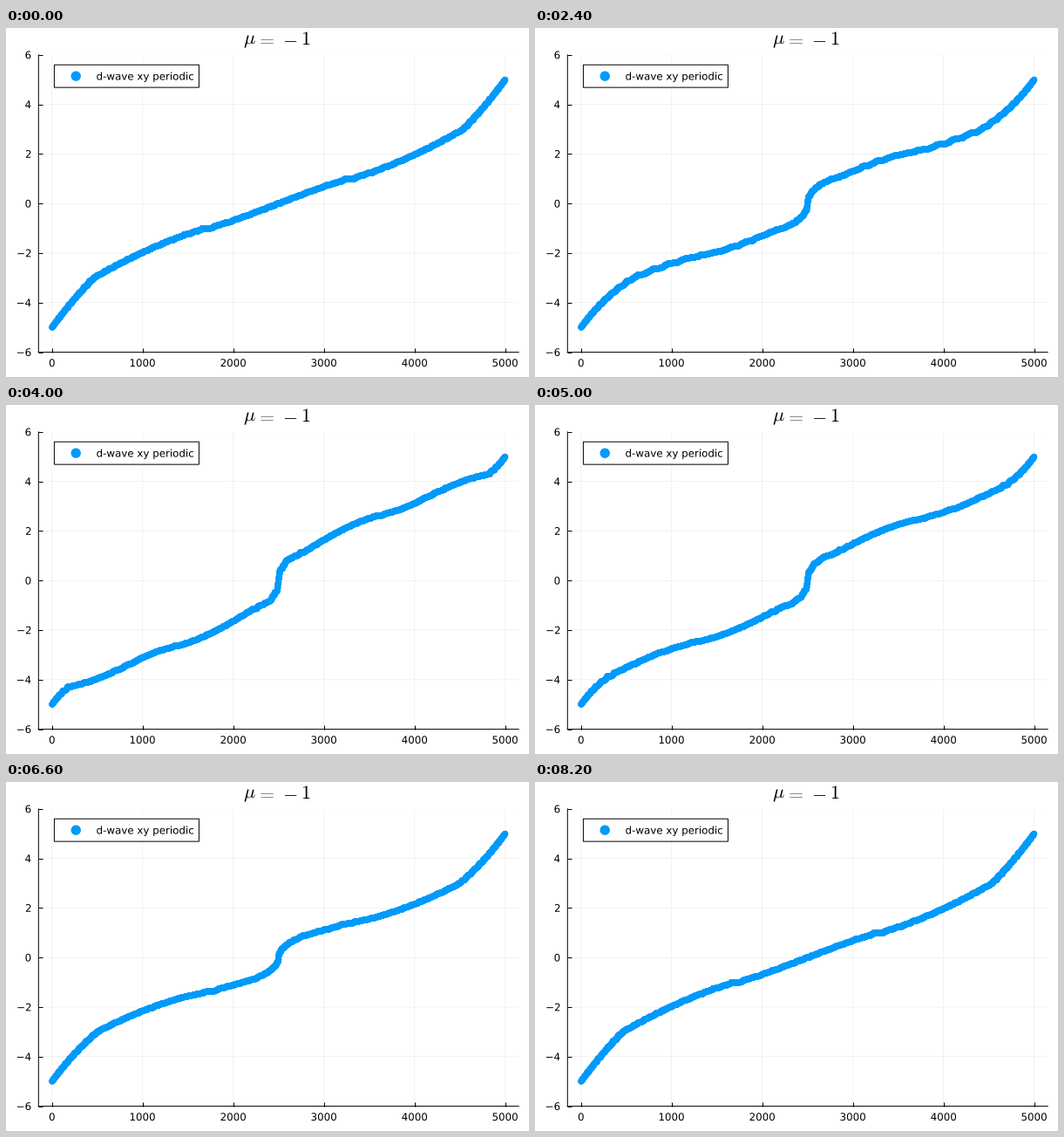
A matplotlib script that plays this animation: 600 px wide and 400 px high, repeating every 8400 ms.

```python
import numpy as np
import matplotlib.pyplot as plt
from matplotlib.animation import FuncAnimation
from matplotlib.patches import Circle, PathPatch, Rectangle
from matplotlib.textpath import TextPath
from matplotlib.transforms import Affine2D

W, H, DPI = 600, 400, 100
PX = 72 / DPI                      # points per pixel
BLUE = "#009AFA"
LEFT, RIGHT, TOP, BOTTOM = 37.3, 588.2, 30.87, 371.61
FONT = 11.85                       # text size in pixels

SITES = 50                         # lattice of SITES x SITES, periodic both ways
MU = -1
STEPS = 20                         # pairing strength climbs from 0 to 1

plt.rcParams.update({
    "font.family": "DejaVu Sans",
    "mathtext.fontset": "cm",
    "text.hinting": "none",
})

k = 2 * np.pi * np.arange(SITES) / SITES
kx, ky = np.meshgrid(k, k)
xi = -2 * (np.cos(kx) + np.cos(ky)) - MU
form = 4 * np.sin(kx) * np.sin(ky)
index = np.arange(1, 2 * SITES**2 + 1)


def spectrum(delta):
    """Sorted quasiparticle energies for a d-wave gap of strength delta."""
    e = np.hypot(xi, delta * form).ravel()
    return np.sort(np.concatenate([-e, e]))


fig = plt.figure(figsize=(W / DPI, H / DPI), dpi=DPI, facecolor="white")

ax = fig.add_axes([LEFT / W, 1 - BOTTOM / H, (RIGHT - LEFT) / W, (BOTTOM - TOP) / H])
margin = 0.03 * (index[-1] - index[0])
x0, x1 = index[0] - margin, index[-1] + margin
ax.set_xlim(x0, x1)
ax.set_ylim(-6, 6)
ax.set_xticks(range(0, 5001, 1000))
ax.set_yticks(range(-6, 7, 2))
ax.set_axisbelow(True)
ax.grid(color="black", alpha=0.1, linewidth=0.5 * PX)
ax.tick_params(direction="in", length=4.7 * PX, width=1 * PX,
               labelleft=False, labelbottom=False)
for side in ("top", "right"):
    ax.spines[side].set_visible(False)
for side in ("left", "bottom"):
    ax.spines[side].set_linewidth(1 * PX)

# keep thin lines at their true subpixel positions
for axis in (ax.xaxis, ax.yaxis):
    for line in [*axis.get_gridlines(), *axis.get_ticklines()]:
        line.set_snap(False)
for spine in ax.spines.values():
    spine.set_snap(False)

# one size per point keeps the dots at subpixel positions
dots = ax.scatter(index, spectrum(0), s=np.full(index.size, (7.2 * PX) ** 2),
                  c=BLUE, edgecolors="none", zorder=3)

# overlay in pixel coordinates for all text and the legend
top = fig.add_axes([0, 0, 1, 1])
top.set_xlim(0, W)
top.set_ylim(H, 0)
top.axis("off")


def label(x, y, text, anchor):
    """Outline text on baseline y; anchor 0, 0.5, 1 is left, centre, right."""
    path = TextPath((0, 0), text, size=FONT)
    box = path.get_extents()
    shift = x - box.x0 - anchor * box.width
    path = Affine2D().scale(1, -1).translate(shift, y).transform_path(path)
    top.add_patch(PathPatch(path, facecolor="black", linewidth=0, snap=False))


for v in range(0, 5001, 1000):
    label(LEFT + (v - x0) / (x1 - x0) * (RIGHT - LEFT), 388, str(v), 0.5)
for v in range(-6, 7, 2):
    y = BOTTOM - (v + 6) / 12 * (BOTTOM - TOP)
    label(LEFT - 8.9, y + 4.32, str(v).replace("-", "\u2212"), 1)

for x, glyph, color in ((279.5, r"$\mu$", "black"), (298, "$=$", "#777777"),
                        (326, "$-$", "black"), (343.7, "$1$", "black")):
    top.text(x, 18.6, glyph, size=22 * PX, color=color, ha="center", va="baseline")

top.add_patch(Rectangle((55.4, 42.2), 166, 25.92, facecolor="white",
                        edgecolor="black", linewidth=1 * PX, snap=False))
top.add_patch(Circle((80.2, 55.15), 5.7, facecolor=BLUE, edgecolor="none"))
label(104.2, 59.47, "d-wave xy periodic", 0)


def update(i):
    step = min(i, 2 * STEPS + 1 - i)
    dots.set_offsets(np.column_stack([index, spectrum(step / STEPS)]))
    return (dots,)


anim = FuncAnimation(fig, update, frames=2 * STEPS + 2, interval=200,
                     repeat=True, repeat_delay=0)
plt.show()
```
